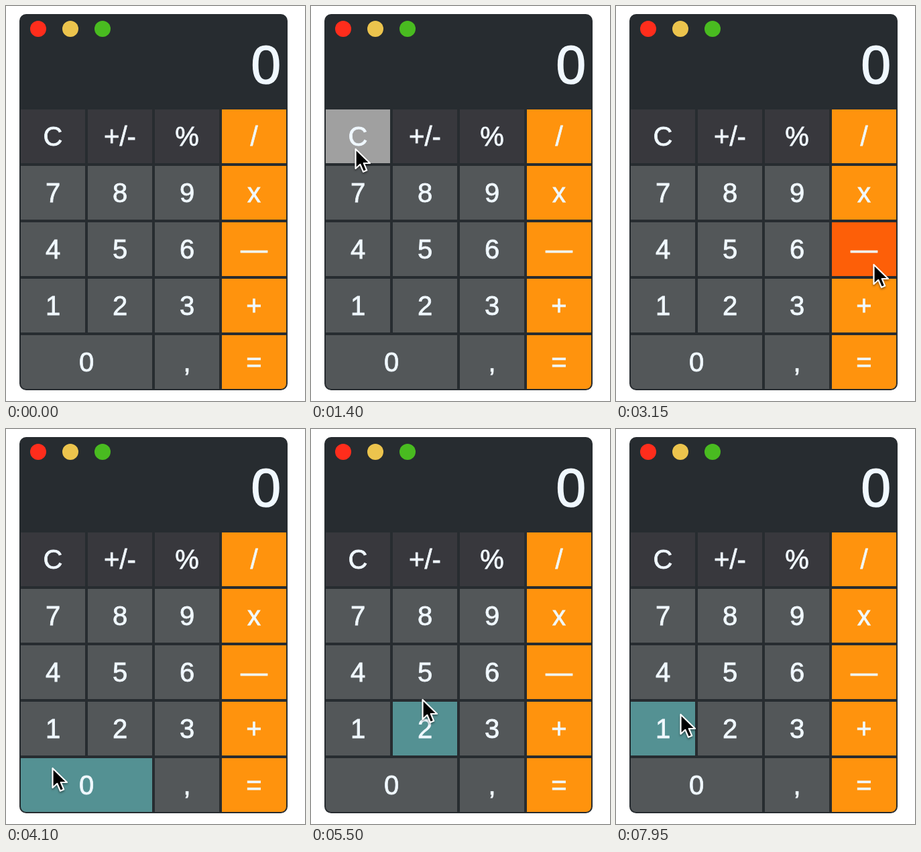
These frames come from a looping animation (446 by 588 pixels, 8 s). An HTML page:

```html
<!DOCTYPE html>
<html lang="en">
<head>
<meta charset="utf-8">
<title>Calculator</title>
<style>
  html, body { margin: 0; width: 100%; height: 100%; overflow: hidden; background: #fff; }
  svg { display: block; width: 446px; height: 588px; cursor: default; }
  text {
    font-family: "Liberation Sans", Arial, sans-serif; font-size: 40px; text-anchor: middle;
    fill: #f0f8ff; stroke: #f0f8ff; stroke-width: .8;
  }
  #display { font-size: 80px; text-anchor: end; stroke-width: 1.6; }
  #pointer { stroke: #fff; stroke-width: 2.2; stroke-linejoin: round; filter: drop-shadow(0 2px 1.5px #0006); }
</style>
</head>
<body>
<svg viewBox="0 0 446 588">
  <clipPath id="inner"><rect x="22" y="14" width="396" height="556" rx="8"/></clipPath>
  <rect x="20" y="12" width="400" height="560" rx="10" fill="#272c30"/>
  <circle cx="48" cy="34" r="12" fill="#ff2d1c"/>
  <circle cx="96" cy="34" r="12" fill="#ecc44d"/>
  <circle cx="144" cy="34" r="12" fill="#49bb20"/>
  <text id="display" x="410" y="115">0</text>
  <g id="keys" clip-path="url(#inner)"></g>
  <path id="pointer" d="M.5 3V32L7.3 25.8L12 36.8L17.2 34.6L12.8 24H22Z"/>
</svg>
<script>
const DURATION = 8000, STEP = 50, TRAIL = 100;
const SVG = "http://www.w3.org/2000/svg";
const display = document.getElementById("display");
const pointer = document.getElementById("pointer");
const keyGroup = document.getElementById("keys");

const styles = {
  command: { idle: "#38383d", hover: "#a0a0a0" },
  digit: { idle: "#535759", hover: "#549193" },
  operator: { idle: "#ff930d", hover: "#fd5f08" }
};
const rows = [["C", "+/-", "%", "/"], ["7", "8", "9", "x"], ["4", "5", "6", "—"], ["1", "2", "3", "+"], ["0", "", ",", "="]];

function add(name, attributes) {
  const node = document.createElementNS(SVG, name);
  for (const key in attributes) node.setAttribute(key, attributes[key]);
  return keyGroup.appendChild(node);
}

const keys = rows.flatMap((labels, row) => labels.map((label, column) => {
  if (!label) return null;
  const x = 22 + column * 100, y = 154 + row * 84, width = label === "0" ? 196 : 96;
  const style = column === 3 ? styles.operator : row === 0 ? styles.command : styles.digit;
  const rect = add("rect", { x, y, width, height: 80 });
  add("text", { x: x + width / 2, y: y + 54 }).textContent = label;
  return { label, x, y, width, style, rect };
})).filter(Boolean);

// Each leg crosses the named keys at an even pace and ends at a point.
const legs = [
  { until: 1400, via: "47", x: 66, y: 210 },
  { until: 3150, via: "%/x", x: 384, y: 382 },
  { until: 4100, via: "=,", x: 69, y: 502 },
  { until: 5500, via: "1782", x: 166, y: 400 },
  { until: 6550, via: "555", x: 274, y: 282 },
  { until: 7950, via: "x62", x: 96, y: 422 }
];
const stops = [{ time: STEP, x: 20, y: 365 }];
for (const { until, via, x, y } of legs) {
  const start = stops.at(-1).time, hop = (until - start) / (via.length + 1);
  [...via].forEach((label, i) => {
    const key = keys.find(k => k.label === label);
    stops.push({ time: start + hop * (i + 1), x: key.x + key.width / 2, y: key.y + 40 });
  });
  stops.push({ time: until, x, y });
}

function pointerAt(time) {
  const next = stops.findIndex(stop => stop.time >= time);
  if (next < 1) return stops[0];
  const a = stops[next - 1], b = stops[next];
  const p = (time - a.time) / (b.time - a.time), eased = p * p * (3 - 2 * p);
  return { x: a.x + (b.x - a.x) * eased, y: a.y + (b.y - a.y) * eased };
}

function readingAt(time) {
  if (time < 5750 || time >= 6900) return "0";
  return time < 6050 ? "5" : "55";
}

function draw(now) {
  const time = Math.floor(now % DURATION / STEP) * STEP;
  const tip = pointerAt(time);
  pointer.setAttribute("transform", `translate(${tip.x} ${tip.y})`);
  pointer.setAttribute("visibility", time < STEP ? "hidden" : "visible");

  // The highlight trails the pointer slightly.
  const spot = pointerAt(time - TRAIL);
  for (const { x, y, width, style, rect } of keys) {
    const over = spot.x > x && spot.x < x + width && spot.y > y && spot.y < y + 80;
    rect.setAttribute("fill", over ? style.hover : style.idle);
  }
  display.textContent = readingAt(time);
}

const start = performance.now();
function frame() {
  draw(performance.now() - start);
  requestAnimationFrame(frame);
}
frame();
</script>
</body>
</html>
```
